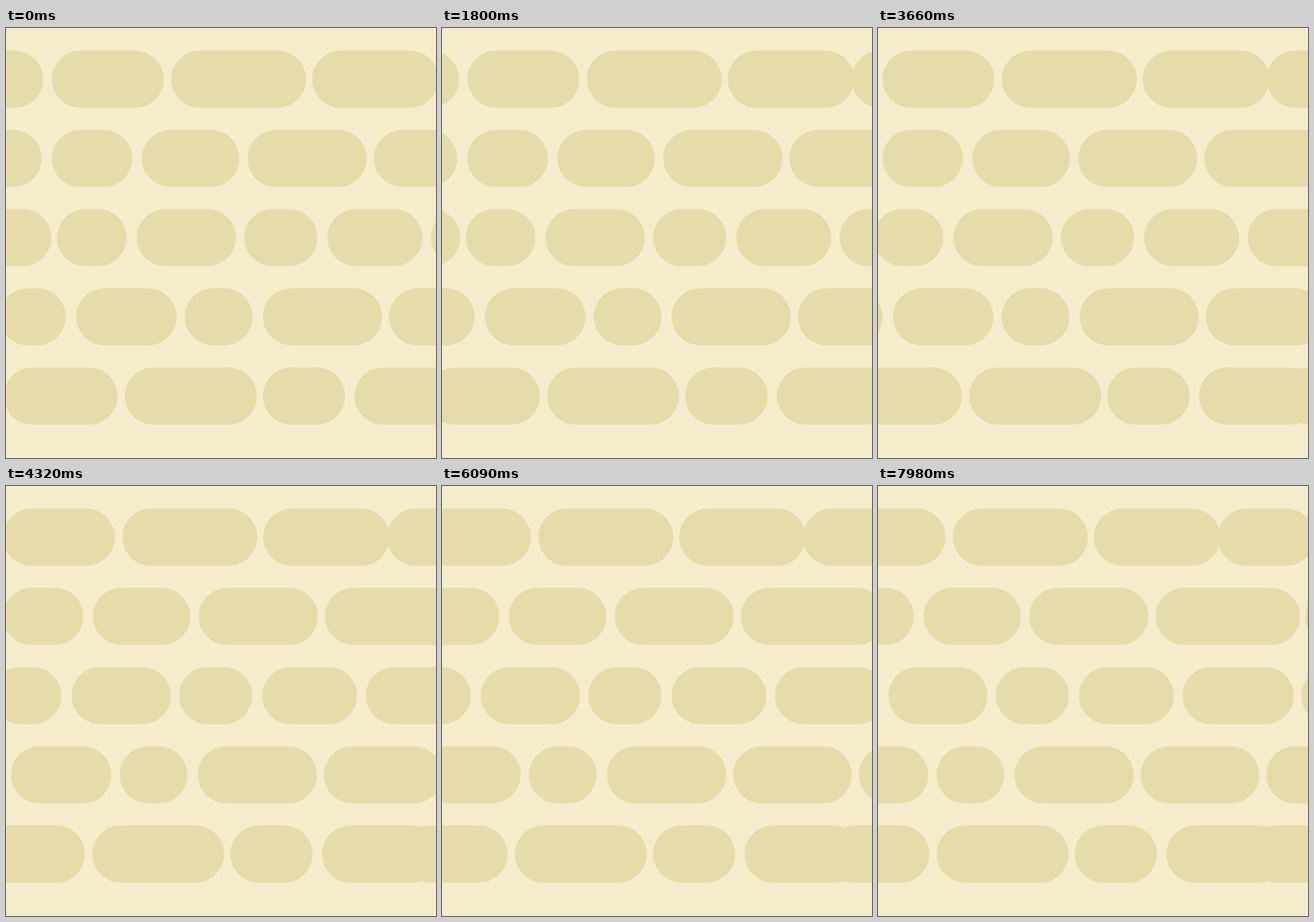
These frames come from a looping animation (748 px wide and 748 px high, 8 s). An HTML page:

```html
<!DOCTYPE html>
<html lang="en">
<head>
<meta charset="utf-8">
<title>Drifting pills</title>
<style>
  html, body { margin: 0; width: 100%; height: 100%; overflow: hidden; background: #f5eccb; }
  svg { display: block; width: 100%; height: 100%; fill: #e6dcaa; }
</style>
</head>
<body>
<svg id="stage" viewBox="0 0 760 760"></svg>
<script>
const LOOP = 8000, STEP = 30;
const STAGE = 760, TOP = 40, ROW_GAP = 140, HEIGHT = 101, ENTRY_WIDTH = 172;

// speed: units per step; starts: where each pill begins at time 0
// enters: one more pill sets out from the right edge, over its neighbour
const rows = [
  { speed: 0.6, starts: [-103, 81, 292, 541, 776], enters: true },
  { speed: 0.6, starts: [-59, 81, 240, 427, 650, 915, 1090] },
  { speed: 0.8, starts: [-169, 90, 231, 421, 568, 751, 961, 1140] },
  { speed: 0.8, starts: [-12, 124, 316, 454, 677, 899, 1090] },
  { speed: 0.4, starts: [-4, 210, 454, 616, 838], enters: true }
];

// Short pills leave a wider gap before the next one.
const pillWidth = pitch => pitch - (27.8 - 0.0695 * pitch);

const stage = document.getElementById("stage");

function add(parent, name, attributes = {}) {
  const node = document.createElementNS(stage.namespaceURI, name);
  for (const key in attributes) node.setAttribute(key, attributes[key]);
  return parent.appendChild(node);
}

rows.forEach((row, i) => {
  row.group = add(stage, "g");
  const addPill = (x, width) => add(row.group, "rect", {
    x, y: TOP + i * ROW_GAP, width, height: HEIGHT, rx: HEIGHT / 2
  });
  row.starts.slice(1).forEach((next, k) => {
    const x = row.starts[k];
    addPill(x, pillWidth(next - x));
  });
  if (row.enters) addPill(STAGE, ENTRY_WIDTH);
});

let begin;
function draw(now) {
  begin ??= now;
  const step = Math.floor(((now - begin) % LOOP) / STEP);
  for (const { speed, group } of rows) {
    group.setAttribute("transform", `translate(${-speed * step} 0)`);
  }
  requestAnimationFrame(draw);
}
requestAnimationFrame(draw);
</script>
</body>
</html>
```
